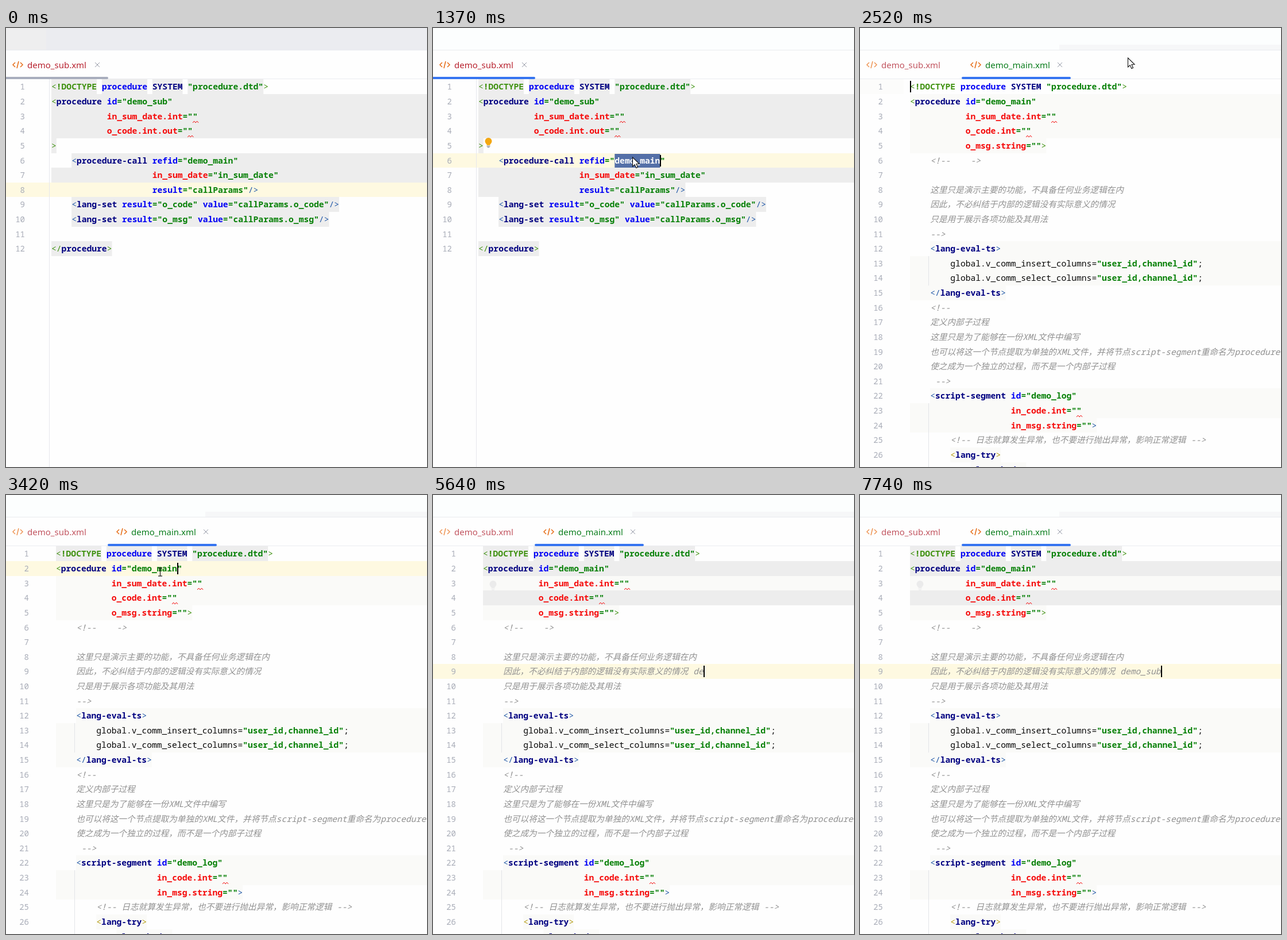
These frames come from a looping animation (733 px wide and 764 px high, 8 s). An HTML page with a canvas:

```html
<!DOCTYPE html>
<html lang="en">
<head>
<meta charset="utf-8">
<style>
html, body { margin: 0; width: 100%; height: 100%; overflow: hidden; background: #fefefe; }
canvas { display: block; }
</style>
</head>
<body>
<canvas id="stage" width="733" height="764"></canvas>
<script>
const g = document.getElementById('stage').getContext('2d');
const W = 733, H = 764, LOOP = 8000;
const SIZE = 14.65, CW = SIZE * 0.6, ROW = 25.62, TOP = 89.42;
const MONO = '"Noto Sans Mono", "Noto Sans CJK SC", monospace';
const UI = '"Noto Sans", sans-serif';
const GRAY = '#ededed', FAINT = '#fafaf8', YELLOW = '#fef9e1', COMMENT = '#909090';
const GREEN = '#078007', BLUE = '#0000f5', NAVY = '#000080', RED = '#f50a0a';
const BRACKET = { 0: '#3f9110', 4: '#2158a8', 8: '#b39a10', 12: '#3f9110' };

// Lines that start with # are comments.
const SUB = `<!DOCTYPE procedure SYSTEM "procedure.dtd">
<procedure id="demo_sub"
           in_sum_date.int=""
           o_code.int.out=""
>
    <procedure-call refid="demo_main"
                    in_sum_date="in_sum_date"
                    result="callParams"/>
    <lang-set result="o_code" value="callParams.o_code"/>
    <lang-set result="o_msg" value="callParams.o_msg"/>

</procedure>`.split('\n');

const MAIN = `<!DOCTYPE procedure SYSTEM "procedure.dtd">
<procedure id="demo_main"
           in_sum_date.int=""
           o_code.int=""
           o_msg.string="">
#    <!--    ->

#    这里只是演示主要的功能，不具备任何业务逻辑在内
#    因此，不必纠结于内部的逻辑没有实际意义的情况
#    只是用于展示各项功能及其用法
#    -->
    <lang-eval-ts>
        global.v_comm_insert_columns="user_id,channel_id";
        global.v_comm_select_columns="user_id,channel_id";
    </lang-eval-ts>
#    <!--
#    定义内部子过程
#    这里只是为了能够在一份XML文件中编写
#    也可以将这一个节点提取为单独的XML文件，并将节点script-segment重命名为procedure
#    使之成为一个独立的过程，而不是一个内部子过程
#     -->
    <script-segment id="demo_log"
                    in_code.int=""
                    in_msg.string="">
#        <!-- 日志就算发生异常，也不要进行抛出异常，影响正常逻辑 -->
        <lang-try>
            <lang-body>`.split('\n');

// y, icon, label (& marks the mnemonic), shortcut, shortcut x
const MENU = [
  [53, 'square', 'XProc4J Jump Source'],
  [86, '', 'LocalReferenceChecker', 'Ctrl', 712],
  [128, 'pin', 'Show Navigation Destinations...', 'Meta', 712],
  [160, 'pin', 'Show Module Configuration'],
  [203, 'pin', 'Goto Gradle (task or group)...'],
  [245, 'pin', 'Goto Maven POM (pom.xml)'],
  [277, 'pin', 'Goto Project (source root)'],
  [308, 'pin', 'Goto Project (resource root)'],
  [351, 'marker', 'Toggle Highlight of All Occurrences', 'Ctrl', 717],
  [383, 'lamp', 'Show Context Actions'],
  [425, 'cut', 'Cu&t'],
  [457, 'copy', '&Copy'],
  [489, 'braces', 'Arthas Copy JSON'],
  [521, '', 'Arthas Command'],
  [552, 'paste', '&Paste'],
  [584, '', 'Copy / Paste Special'],
  [616, '', 'Column Selection &Mode', 'Alt+Shift', 687],
  [659, 'pencil', 'String Manipulation'],
  [701, '', 'Find in Files', 'Ctrl', 715],
  [733, '', 'Find &Usages'],
  [765, '', '&Go To']
];

// Pointer legs: start, end, then the points passed through
const LEGS = [
  [140, 600, [405, 733], [385, 420], [347, 225]],
  [1550, 1890, [347, 225], [420, 130], [466, 52]],
  [2520, 3260, [466, 52], [380, 95], [268, 134]],
  [4190, 4370, [268, 134], [335, 176], [404, 159], [388, 188]],
  [4370, 4570, [388, 188], [382, 184]],
  [4960, 5280, [382, 184], [480, 308]],
  [6690, 7170, [480, 308], [556, 318], [525, 337]]
];
const TYPED = ' demo_sub';
const KEYS = [5420, 5560, 5640, 5740, 5840, 6080, 6240, 6240, 7620];
const CARET_OFF = [[940, 1270], [2780, 3260], [3850, 4030], [4710, 4960], [6840, 7350]];

const within = (t, a, b) => t >= a && t < b;
const rowTop = n => Math.round(TOP + (n - 1) * ROW);

function box(x, y, w, h, color) {
  g.fillStyle = color;
  g.fillRect(x, y, w, h);
}
function text(s, x, y, color, font) {
  g.font = font;
  g.fillStyle = color;
  g.fillText(s, x, y);
}
function line(points, color, width = 1) {
  g.strokeStyle = color;
  g.lineWidth = width;
  g.beginPath();
  points.forEach(([x, y]) => g.lineTo(x, y));
  g.stroke();
}
function disc(x, y, r, color) {
  g.fillStyle = color;
  g.beginPath();
  g.arc(x, y, r, 0, 7);
  g.fill();
}
function rounded(x, y, w, h, r, color) {
  g.fillStyle = color;
  g.beginPath();
  g.roundRect(x, y, w, h, r);
  g.fill();
}
const rowBox = (n, x, w, color) => box(x, rowTop(n), w, rowTop(n + 1) - rowTop(n), color);

function backgrounds(lines, x0, shade) {
  let open = false;
  lines.forEach((s, i) => {
    const n = i + 1, color = shade(n);
    if (i === 0) {
      if (color) for (const m of s.matchAll(/[^ >]+/g)) rowBox(1, x0 + m.index * CW, m[0].length * CW, color);
      return;
    }
    if (!s || s[0] === '#') return;
    const from = open ? 0 : s.search(/\S/);
    open = !s.endsWith('>') || s.includes('<lang-eval');
    rowBox(n, x0 + from * CW, open ? W : (s.length - from) * CW, color);
  });
}

function code(lines, x0, numX) {
  let bracket = BRACKET[0];
  lines.forEach((s, i) => {
    const y = rowTop(i + 1) + 18;
    g.textAlign = 'right';
    text(i + 1, numX, y, '#a9adb8', '14px ' + MONO);
    g.textAlign = 'left';
    if (s[0] === '#') {
      const indent = s.slice(1).search(/\S/);
      text(s.slice(1 + indent), x0 + indent * CW, y, COMMENT, `italic ${SIZE}px ${MONO}`);
      return;
    }
    const indent = s.search(/\S/), script = s.includes('global.');
    if (s[indent] === '<') bracket = BRACKET[indent];
    for (const m of s.matchAll(/"[^"]*"|[<>\/]+|=|[^\s<>="\/]+/g)) {
      const tok = m[0], attr = s[m.index + tok.length] === '=';
      let color = NAVY, weight = 'bold';
      if (tok[0] === '"') color = GREEN;
      else if (script) { color = '#080808'; weight = 'normal'; }
      else if (tok === '=') color = GREEN;
      else if (/^[<>\/]/.test(tok) || tok[0] === '!') color = bracket;
      else if (attr) color = tok.includes('_') ? RED : BLUE;
      else if (i === 0 && tok === 'procedure') color = BLUE;
      if (/^[<>\/]/.test(tok)) weight = 'normal';
      text(tok, x0 + m.index * CW, y, color, `${weight} ${SIZE}px ${MONO}`);
    }
    if (s.endsWith('""')) {
      const x = x0 + (s.length - 1) * CW;
      line([[x, y + 6], [x + 2.5, y + 3], [x + 5, y + 6], [x + 7.5, y + 3], [x + 10, y + 6]], RED);
    }
  });
}

function selection(n, x) {
  box(x, rowTop(n) + 1, 9 * CW, 24, '#5470a8');
  text('demo_main', x, rowTop(n) + 18, '#fff', `bold ${SIZE}px ${MONO}`);
}

function bulb(x, y, color = '#f3a712', base = '#6c707e') {
  disc(x, y - 2, 6, color);
  box(x - 3, y + 2, 6, 3, color);
  box(x - 3, y + 6, 6, 1, base);
  box(x - 2, y + 8, 4, 1, base);
}

function tab(x, label, color, icon, close) {
  line([[x + 5, 60], [x + 1, 64], [x + 5, 68]], icon, 1.5);
  line([[x + 11, 58], [x + 8, 70]], icon, 1.5);
  line([[x + 14, 60], [x + 18, 64], [x + 14, 68]], icon, 1.5);
  text(label, x + 26, 70, color, '15px ' + UI);
  if (!close) return;
  line([[close - 4, 60], [close + 4, 68]], '#9599a6');
  line([[close + 4, 60], [close - 4, 68]], '#9599a6');
}

const ICONS = {
  square: y => box(367, y - 8, 15, 15, '#d6cb72'),
  pin(y) {
    disc(375, y - 3, 6.8, '#1f2023');
    g.beginPath();
    g.moveTo(368.6, y - 1);
    g.lineTo(375, y + 9);
    g.lineTo(381.4, y - 1);
    g.fill();
    disc(375, y - 3, 2.4, '#fff');
  },
  marker(y) {
    line([[371, y + 3], [382, y - 8]], '#6c707e', 3);
    box(367, y + 4, 16, 3, '#db5c5c');
  },
  lamp(y) {
    g.strokeStyle = '#6c707e';
    g.lineWidth = 1.2;
    g.beginPath();
    g.arc(375, y - 3, 5.5, 2.2, 7.2);
    g.lineTo(377.5, y + 4.5);
    g.lineTo(372.5, y + 4.5);
    g.closePath();
    g.stroke();
    line([[373, y + 8], [377, y + 8]], '#6c707e');
  },
  cut(y) {
    line([[371, y - 4], [382, y + 4]], '#6c707e', 1.2);
    line([[371, y + 4], [382, y - 4]], '#6c707e', 1.2);
    for (const d of [-4, 4]) {
      disc(370, y + d, 2.8, '#6c707e');
      disc(370, y + d, 1.6, '#fff');
    }
  },
  copy(y) {
    g.strokeStyle = '#6c707e';
    g.lineWidth = 1.2;
    g.strokeRect(370.5, y - 7.5, 11, 12);
    line([[368, y - 5], [368, y + 7.5], [379, y + 7.5]], '#6c707e', 1.2);
    for (const d of [-4, -1, 2]) line([[373, y + d], [379, y + d]], '#6c707e');
  },
  braces: y => text('{ }', 366, y + 5, '#b5b8c2', '14px ' + UI),
  paste(y) {
    g.strokeStyle = '#6c707e';
    g.lineWidth = 1.3;
    g.strokeRect(368.5, y - 6.5, 13, 14);
    box(371, y - 9, 8, 4, '#6c707e');
    for (const d of [-2, 1, 4]) line([[371, y + d], [379, y + d]], '#6c707e');
  },
  pencil(y) {
    line([[369, y + 5], [380, y - 6]], '#55a76a', 4.5);
    line([[367, y + 7], [371, y + 3]], '#55a76a', 2);
  }
};

function menu(px, py) {
  box(347, 29, W, H, '#fefefe');
  line([[W, 30.5], [347.5, 30.5], [347.5, H]], '#b4b7c2');
  for (const [y, icon, label, keys, kx] of MENU) {
    if (px > 356 && Math.abs(py - y) < 16) rounded(356, y - 14, 400, 28, 4, '#d0dffd');
    if (icon) ICONS[icon](y);
    const mark = label.indexOf('&'), s = label.replace('&', '');
    text(s, 390, y + 5, icon === 'braces' ? '#b5b8c2' : '#080808', '15.4px ' + UI);
    if (mark >= 0) {
      const x = 390 + g.measureText(s.slice(0, mark)).width;
      box(x, y + 7, g.measureText(s[mark]).width, 1, '#080808');
    }
    if (keys) text(keys, kx, y + 5, '#a3a6b0', '15px ' + UI);
  }
}

function pointerAt(t) {
  let pos = LEGS[0][2];
  for (const [a, b, ...pts] of LEGS) {
    if (t < a) break;
    const k = Math.min(1, (t - a) / (b - a));
    const u = (1 - Math.cos(Math.PI * k)) / 2 * (pts.length - 1);
    const i = Math.min(Math.floor(u), pts.length - 2), f = u - i;
    pos = [0, 1].map(j => pts[i][j] + (pts[i + 1][j] - pts[i][j]) * f);
  }
  return pos;
}

function arrow(x, y) {
  const p = [[0, 0], [0, 16], [3.7, 12.6], [6.3, 18.4], [9, 17.2], [6.5, 11.5], [11.5, 11.3]];
  g.beginPath();
  p.forEach(([a, b]) => g.lineTo(x + a + 0.5, y + b));
  g.closePath();
  g.fillStyle = '#fff';
  g.fill();
  g.strokeStyle = '#111';
  g.lineWidth = 1.1;
  g.stroke();
}
function beam(x, y) {
  x = Math.round(x) + 0.5;
  y = Math.round(y);
  line([[x, y - 7], [x, y + 7]], '#222', 1.3);
  for (const d of [-7, 7]) line([[x - 3.5, y + d], [x + 3.5, y + d]], '#222', 1.3);
}

function draw(t) {
  const main = t >= 2150, focused = t >= 600, menuOpen = within(t, 1390, 2110);
  const [px, py] = pointerAt(t);
  const typed = KEYS.filter(k => t >= k).length;
  const x0 = main ? 87 : 79, typeX = x0 + 4 * CW + 22 * SIZE;
  let row, caret;
  if (!main) {
    row = focused ? 6 : 8;
    caret = x0 + (t < 760 ? 31 : 36) * CW;
  } else if (t < 3400) { row = 1; caret = x0; }
  else if (t < 4430) { row = 2; caret = x0 + 24 * CW; }
  else if (t < 5300) { row = 4; caret = x0 + 24 * CW; }
  else { row = 9; caret = typeX + typed * CW; }

  box(0, 0, W, H, '#fefefe');
  box(0, 0, W, 39, focused ? '#fcfefe' : '#ebecf0');
  if (!focused) box(0, 0, 70, 39, '#eeeeef');
  if (t >= 2110) box(347, 29, W, 9, '#f6f7f8');
  box(0, 38, W, 1, '#e9ebef');
  box(0, 88, W, 1, '#ebecf0');

  const shade = !main ? () => GRAY : n =>
    n === 1 ? (t >= 3400 ? GRAY : '') :
    (n === 2 && t >= 4430) || (n === 4 && t >= 5300) ? GRAY : FAINT;
  backgrounds(main ? MAIN : SUB, x0, shade);
  if (!main || row > 1) rowBox(row, 0, W, YELLOW);
  else rowBox(1, 0, 76, '#fcfcfb');

  if (main) {
    box(119, rowTop(13), 1, 2 * ROW, '#e3e4e8');
    box(119, rowTop(23), 1, 5 * ROW, '#e3e4e8');
    tab(11, 'demo_sub.xml', '#c25560', '#ee9657');
    tab(192, 'demo_main.xml', '#0a7d1c', '#e66d17', 348);
    rounded(177, 85, 190, 4, 2, '#3574f0');
  } else {
    box(75, 89, 1, H, '#e6e7ec');
    tab(11, 'demo_sub.xml', '#b8222f', '#e66d17', 159);
    rounded(-4, 85, 182, 4, 2, focused && !menuOpen ? '#3574f0' : '#a8adbd');
  }

  code(main ? MAIN : SUB, x0, main ? 40 : 33);
  text(TYPED.slice(0, typed), typeX, rowTop(9) + 18, COMMENT, `italic ${SIZE}px ${MONO}`);

  if (within(t, 760, 2150)) selection(6, x0 + 27 * CW);
  if (within(t, 3560, 4430)) selection(2, x0 + 15 * CW);
  if (within(t, 1270, 2150)) bulb(96.5, 199);
  if (within(t, 4030, 4430)) bulb(104.5, 157);
  if (t >= 4430) bulb(104.5, 157, '#ebebeb', '#ebebeb');
  if (within(t, 4710, 5300)) bulb(104.5, 179);
  if (within(t, 6740, 7620)) bulb(104.5, 277);

  if (focused && !CARET_OFF.some(([a, b]) => within(t, a, b)))
    box(Math.round(caret), rowTop(row) + 3, 2, 20, '#000');

  if (menuOpen) menu(px, py);
  if (within(t, 140, 5420) || within(t, 6690, 7620)) {
    if (within(t, 1370, 2150) || py < 89) arrow(px, py);
    else beam(px, py);
  }
}

const start = performance.now();
function tick() {
  draw((performance.now() - start) % LOOP);
  requestAnimationFrame(tick);
}
tick();
</script>
</body>
</html>
```
